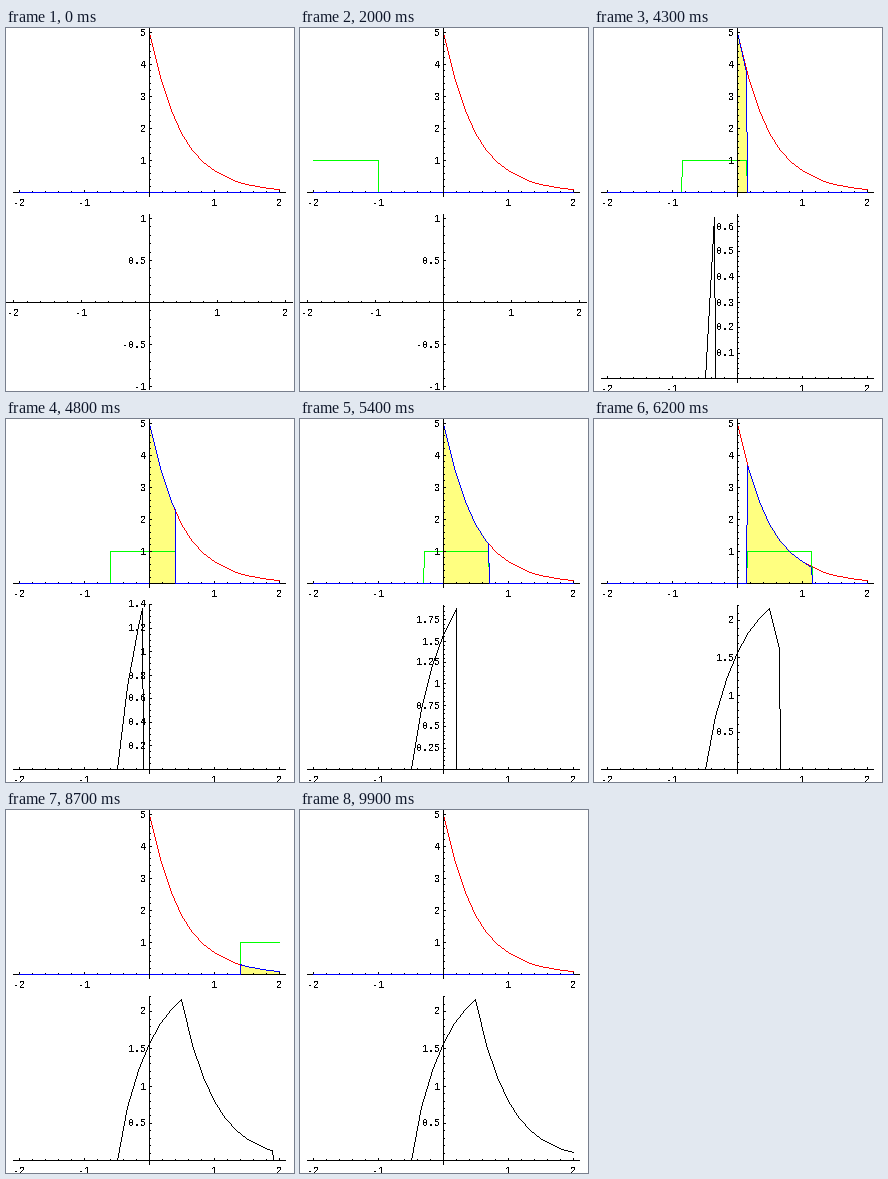
A matplotlib script for the animation above (10000 ms loop, 288x363 px).

```python
import numpy as np
import matplotlib.pyplot as plt
from matplotlib.animation import FuncAnimation

W, H, DPI = 288, 363, 100
PX = 72 / DPI                      # one pixel in points
FRAMES, INTERVAL = 100, 100
CX = 143.5                         # column of the vertical axes
EPS = 0.004                        # half width of a sampled jump
GRID = np.linspace(-2 + 1e-6, 2 - 1e-6, 25)
MAJOR, MINOR = 2, 1                # tick lengths

BLACK, RED, GREEN = (0, 0, 0), (255, 0, 0), (0, 255, 0)
BLUE, YELLOW = (0, 0, 255), (255, 255, 128)

plt.rcParams["text.antialiased"] = False
plt.rcParams["font.family"] = "Liberation Mono"

fig = plt.figure(figsize=(W / DPI, H / DPI), dpi=DPI, facecolor="white")
ax = fig.add_axes([0, 0, 1, 1])
canvas = np.empty((H, W, 3), np.uint8)


def decay(x):
    return np.where(x >= -1e-12, 5 * np.exp(-2 * x), 0)


def convolved(x):
    """Integral of the decay over a unit window centred on x."""
    lo, hi = np.maximum(x - 0.5, 0), np.maximum(x + 0.5, 0)
    return 2.5 * (np.exp(-2 * lo) - np.exp(-2 * hi))


def samples(*jumps):
    """Plot grid with extra points on both sides of each jump."""
    extra = [j + s for j in jumps for s in (-EPS, EPS)]
    x = np.unique(np.concatenate([GRID, [-1e-9], extra]))
    return x[(x >= GRID[0]) & (x <= GRID[-1])]


def line(x, y, color):
    """One pixel wide polyline without smoothing."""
    x, y = np.floor(x).astype(int), np.floor(y).astype(int)
    for x0, y0, x1, y1 in zip(x, y, x[1:], y[1:]):
        n = max(abs(x1 - x0), abs(y1 - y0)) + 1
        cols = np.floor(np.linspace(x0, x1, n) + 0.5).astype(int)
        rows = np.floor(np.linspace(y0, y1, n) + 0.5).astype(int)
        canvas[rows, cols] = color


def fill(x, y, base):
    """Colour the area between a curve and its baseline."""
    for col in range(int(x[0]), int(x[-1]) + 1):
        top = int(np.interp(col + 0.5, x, y))
        canvas[top:int(base), col] = YELLOW


def label(x, y, value, ha):
    ax.text(x, y, f"{value:g}", size=10 * PX, ha=ha, va="baseline")


def x_axis(y0, scale, left, right):
    line([left, right], [y0, y0], BLACK)
    for i in range(-10, 11):
        if i == 0:
            continue
        x = CX + i / 5 * scale
        major = i % 5 == 0
        line([x, x], [y0, y0 - (MAJOR if major else MINOR)], BLACK)
        if major:
            label(np.floor(x) + 0.5, y0 + 13, i // 5, "center")


def y_axis(y0, scale, top, bottom, step, parts, lo, hi):
    line([CX, CX], [top, bottom], BLACK)
    minor = step / parts
    for i in range(int(np.ceil(lo / minor - 1e-6)), int(hi / minor + 1e-6) + 1):
        if i == 0:
            continue
        y = y0 - i * minor * scale
        major = i % parts == 0
        line([CX, CX + (MAJOR if major else MINOR)], [y, y], BLACK)
        if major:
            label(140, np.floor(y) + 3.5, round(i // parts * step, 6), "right")


def tick_step(top):
    """Smallest round step that gives fewer than eight ticks."""
    for power in (0.01, 0.1, 1):
        for base, parts in ((1, 5), (2, 4), (2.5, 5), (5, 5)):
            if top / (base * power) < 8:
                return base * power, parts


def draw_signals(center):
    y0, sx, sy = 164.5, 65, 32.1
    lo, hi = center - 0.5, center + 0.5
    x = samples(lo, hi)
    box = ((x > lo) & (x < hi)).astype(float)
    product = box * decay(x)
    px = CX + x * sx

    fill(px, y0 - product * sy, y0)
    x_axis(y0, sx, 7, 279)
    right = GRID[12:].clip(0)
    line(CX + right * sx, y0 - decay(right) * sy, RED)
    line(px, y0 - box * sy, GREEN)
    line(px, y0 - product * sy, BLUE)
    y_axis(y0, sy, 0, 168, 1, 5, 0, 5)


def draw_result(center):
    x = samples(center)
    y = np.where(x < center, convolved(x), 0)
    top = y.max()
    if top < 1e-4:
        x_axis(274.5, 68, 0, 286)
        y_axis(274.5, 84, 186, 361, 0.5, 5, -1, 1)
        return
    y0, sx, sy = 350.5, 65, 160.7 / top
    step, parts = tick_step(top)
    x_axis(y0, sx, 7, 279)
    y_axis(y0, sy, 186, 354, step, parts, 0, top * 1.025)
    line(CX + x * sx, y0 - y * sy, BLACK)


def draw(i):
    ax.clear()
    ax.axis("off")
    canvas[:] = 255
    k = i + (i >= 60)              # the window skips its aligned position
    center = -2.5 + k / 20
    draw_signals(center)
    draw_result(center)
    ax.imshow(canvas.copy(), extent=(0, W, H, 0), aspect="auto",
              interpolation="nearest")
    ax.set(xlim=(0, W), ylim=(H, 0))
    return []


anim = FuncAnimation(fig, draw, frames=FRAMES, interval=INTERVAL,
                     init_func=lambda: [], repeat=True, repeat_delay=0)
plt.show()
```
